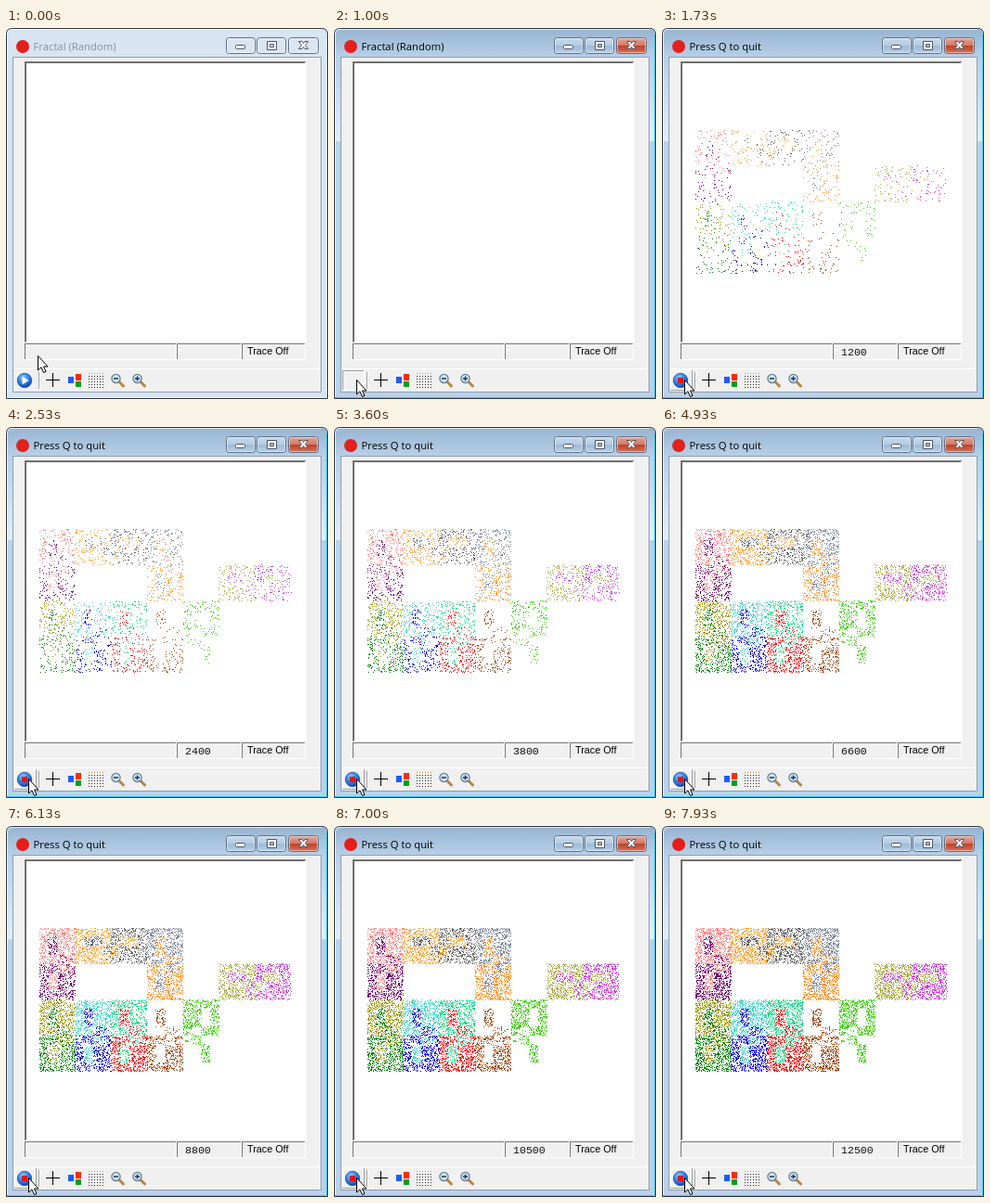
An HTML page with a canvas that plays this animation: 347 by 400 pixels, repeating every 8000 ms.

```html
<!DOCTYPE html>
<html lang="en">
<head>
<meta charset="utf-8">
<title>Fractal</title>
<style>
html, body { margin: 0; width: 100%; height: 100%; overflow: hidden; background: #fff; }
svg, canvas { position: absolute; left: 0; top: 0; }
.sharp { shape-rendering: crispEdges; }
.title { font: 11.3px "Open Sans", "Noto Sans", sans-serif; }
.pane { font: 10.8px "Liberation Sans", sans-serif; }
.count { font: 11.6px "Liberation Mono", monospace; fill: #111; }
</style>
</head>
<body>
<svg width="347" height="400" viewBox="0 0 347 400">
  <defs>
    <linearGradient id="bar" x2="0" y2="1"><stop stop-color="#98b4d1"/><stop offset="1" stop-color="#b7d0e9"/></linearGradient>
    <linearGradient id="side" x2="0" y2="1"><stop stop-color="#b7d0e9"/><stop offset="1" stop-color="#e2eefa"/></linearGradient>
    <linearGradient id="btn" x2="0" y2="1"><stop stop-color="#c5d9ed"/><stop offset=".48" stop-color="#b4cce4"/><stop offset=".5" stop-color="#9db9d6"/><stop offset="1" stop-color="#b5d0ea"/></linearGradient>
    <linearGradient id="red" x2="0" y2="1"><stop stop-color="#e5a593"/><stop offset=".48" stop-color="#d17a66"/><stop offset=".5" stop-color="#bd4127"/><stop offset="1" stop-color="#d5735a"/></linearGradient>
    <radialGradient id="ball" cx=".4" cy=".3" r=".75"><stop stop-color="#8cc8ff"/><stop offset=".5" stop-color="#2f86ea"/><stop offset="1" stop-color="#0a3fae"/></radialGradient>
    <g id="lens">
      <path d="M3.5 3.5L8 8" stroke="#b8863c" stroke-width="3" stroke-linecap="round"/>
      <circle r="4.6" fill="#cfe6fa" stroke="#6b7f96" stroke-width="1.3"/>
    </g>
  </defs>

  <path id="frame" d="M.5 399.500V6.500Q.5 .5 6.500 .5H340.500Q346.500 .5 346.500 6.500V399.500Z" stroke="#2c333b"/>
  <g id="active">
    <path d="M1 32V7Q1 1 7 1H340Q346 1 346 7V32Z" fill="url(#bar)"/>
    <path d="M1 32H346V122H1Z" fill="url(#side)"/>
  </g>
  <path d="M1.500 398V7Q1.500 1.500 7 1.500H340" fill="none" stroke="#fff" stroke-opacity=".75"/>
  <path id="rim" d="M345.500 7V398.500H1" fill="none"/>
  <rect class="sharp" x="7" y="31" width="333" height="362" fill="#8f9eae"/>
  <rect class="sharp" x="8" y="32" width="331" height="360" fill="#f0f0f0"/>
  <circle cx="18" cy="20" r="7" fill="#e3201b"/>
  <text id="title" class="title" x="29.500" y="24"></text>

  <g id="buttons" stroke="#5f6f84">
    <rect x="237.5" y="10.5" width="31" height="17" rx="3"/>
    <rect x="270.5" y="10.5" width="31" height="17" rx="3"/>
    <rect id="close" x="304.5" y="10.5" width="32" height="17" rx="3"/>
  </g>
  <g fill="none" stroke="#fff" stroke-opacity=".5">
    <rect x="238.5" y="11.5" width="29" height="15" rx="2"/>
    <rect x="271.5" y="11.5" width="29" height="15" rx="2"/>
    <rect x="305.5" y="11.5" width="30" height="15" rx="2"/>
  </g>
  <g fill="#fff" stroke="#535666">
    <rect x="247.5" y="18.5" width="10" height="4" rx="1"/>
    <path fill-rule="evenodd" d="M281.500 14.500H291.500V23.500H281.500ZM284.500 17.500H288.500V20.500H284.500Z"/>
    <path d="M315.500 14.500H319L320.500 16.500L322 14.500H325.500L322.500 18.500L325.500 22.500H322L320.500 20.500L319 22.500H315.500L318.500 18.500Z"/>
  </g>

  <g id="panes" class="sharp"></g>
  <text class="pane" x="260" y="352">Trace Off</text>
  <text id="count" class="count" x="193" y="353"></text>

  <g class="sharp">
    <path d="M8 367.500H339" stroke="#fff"/>
    <path d="M35.500 371V389" stroke="#a0a0a0"/>
    <path d="M36.500 371V389" stroke="#fff"/>
    <path d="M43 379.500H58M50.500 372V387" stroke="#000"/>
    <path d="M67 376h6v7h-6z" fill="#1a5cff"/>
    <path d="M75 373h6v7h-6z" fill="#ff2a00"/>
    <path d="M75 381h6v6h-6z" fill="#00a01c"/>
    <path d="M89 372.500H105M89 375.500H105M89 378.500H105M89 381.500H105M89 384.500H105M89 387.500H105" stroke="#333" stroke-dasharray="1 2"/>
    <path d="M89 372.500H105" stroke="#d88a3a" stroke-dasharray="1 2"/>
  </g>
  <use href="#lens" x="118.500" y="378"/>
  <use href="#lens" x="141.500" y="378"/>
  <path d="M116 378H121M139 378H144M141.500 375.500V380.500" stroke="#234" stroke-width="1.300"/>

  <g id="edge" class="sharp" fill="none">
    <path id="lit" d="M9.500 390V369.500H32"/>
    <path id="dim" d="M9 390.500H32.500V369"/>
  </g>
  <g id="ball-icon">
    <circle cx="20" cy="380" r="7.700" fill="url(#ball)" stroke="#1b4fa8" stroke-width=".8"/>
    <path id="play" d="M17.500 375.500L24.500 380L17.500 384.500Z" fill="#fff"/>
    <path id="stop" d="M17 377h6v6h-6z" fill="#f01018"/>
  </g>
  <path id="cursor" d="M.5 .5V16L4 12.800L6.500 18.500L9 17.500L6.500 12H11Z" fill="#fff" stroke="#000"/>
</svg>
<canvas id="plot" width="347" height="340"></canvas>

<script>
const $ = id => document.getElementById(id);
const ctx = $("plot").getContext("2d");
const LOOP = 8000, STEP = 200 / 3, ACTIVATE = 15, RUN = 18;

const sunk = (x, y, w, h, fill) =>
  `<rect x="${x}" y="${y}" width="${w}" height="${h}" fill="${fill}"/>
   <path d="M${x + .5} ${y + h}V${y + .5}H${x + w}" fill="none" stroke="#777"/>
   <path d="M${x} ${y + h - .5}H${x + w - .5}V${y}" fill="none" stroke="#fff"/>`;
$("panes").innerHTML = sunk(20, 36, 304, 304, "#fff") +
  `<path d="M21.500 338V37.500H322" fill="none" stroke="#696969"/>` +
  [[20, 164], [184, 70], [254, 69]].map(([x, w]) => sunk(x, 340, w, 18, "#f0f0f0")).join("");

// Quarter-size copies of the 7 by 4 figure: orientation within a unit cell
const turn = {
  right: (u, v) => [u, v],
  left: (u, v) => [1 - u, v],
  down: (u, v) => [v, u],
  up: (u, v) => [v, 1 - u],
  spin: (u, v) => [1 - v, u]
};
const maps = [
  [0, 0, "down", "#ff8080"], [0, 1, "up", "#700068"],
  [1, 0, "right", "#ffa030"], [2, 0, "left", "#606060"],
  [3, 0, "down", "#808898"], [3, 1, "up", "#ff8c1a"],
  [5, 1, "right", "#a8a840"], [6, 1, "left", "#cc40d8"],
  [0, 2, "down", "#949400"], [0, 3, "up", "#008000"],
  [1, 2, "down", "#48d4cc"], [1, 3, "up", "#0000e0"],
  [2, 2, "down", "#10dc84"], [2, 3, "up", "#f00808"],
  [3, 3, "up", "#a04810"], [4, 2, "spin", "#40cc10"]
];

let seed = 7;
const rand = () => (seed = (seed * 1664525 + 1013904223) % 4294967296) / 4294967296;
const points = [];
let u = 1, v = 1;
for (let i = 0; i < 12800; i++) {
  const [cx, cy, way, color] = maps[Math.floor(rand() * maps.length)];
  const [a, b] = turn[way](u / 4, v / 4);
  u = cx + a;
  v = cy + b;
  points.push([Math.floor(36 + u * 38.72), Math.floor(110 + v * 38.72), color]);
}

// Piecewise linear lookup over [tick, value] pairs
function along(keys, k) {
  const i = keys.findIndex(p => p[0] > k);
  if (i < 0) return keys[keys.length - 1][1];
  if (i === 0) return keys[0][1];
  const [k0, a] = keys[i - 1], [k1, b] = keys[i];
  return a + (b - a) * (k - k0) / (k1 - k0);
}
const progress = [[17, 0], [27, 1400], [30, 1400], [38, 2400], [41, 2700], [43, 2700], [44, 2800],
  [45, 2800], [46, 2900], [54, 3800], [74, 6600], [92, 8800], [119, 12500]];
const pointerX = [[0, 34], [4, 24]];
const pointerY = [[0, 353], [4, 369], [8, 369], [10, 379]];

const show = (id, on) => $(id).setAttribute("visibility", on ? "visible" : "hidden");
const paint = (id, color, name = "fill") => $(id).setAttribute(name, color);

function draw(k) {
  const on = k >= ACTIVATE, run = k >= RUN, pressed = on && !run;
  show("active", on);
  paint("frame", on ? "#b9d1ea" : "#d7e4f2");
  paint("rim", on ? "#35cdf5" : "#eef4fa", "stroke");
  paint("buttons", on ? "url(#btn)" : "#d9e5f1");
  paint("close", on ? "url(#red)" : "#d9e5f1");
  paint("title", on ? "#000" : "#8a8f96");
  $("title").textContent = run ? "Press Q to quit" : "Fractal (Random)";

  show("edge", k >= 3);
  paint("lit", pressed ? "#a0a0a0" : "#fff", "stroke");
  paint("dim", pressed ? "#fff" : "#a0a0a0", "stroke");
  show("ball-icon", !pressed);
  $("play").style.display = run ? "none" : "";
  $("stop").style.display = run ? "" : "none";
  $("cursor").setAttribute("transform",
    `translate(${Math.round(along(pointerX, k))} ${Math.round(along(pointerY, k))})`);

  const n = Math.round(along(progress, k));
  $("count").textContent = n >= 100 ? Math.floor(n / 100) * 100 : "";
  ctx.clearRect(0, 0, 347, 340);
  for (const [x, y, color] of points.slice(0, n)) {
    ctx.fillStyle = color;
    ctx.fillRect(x, y, 1, 1);
  }
}

let last = -1;
function tick() {
  const k = Math.floor((performance.now() % LOOP + 4) / STEP) % 120;
  if (k !== last) draw(last = k);
  requestAnimationFrame(tick);
}
tick();
</script>
</body>
</html>
```
